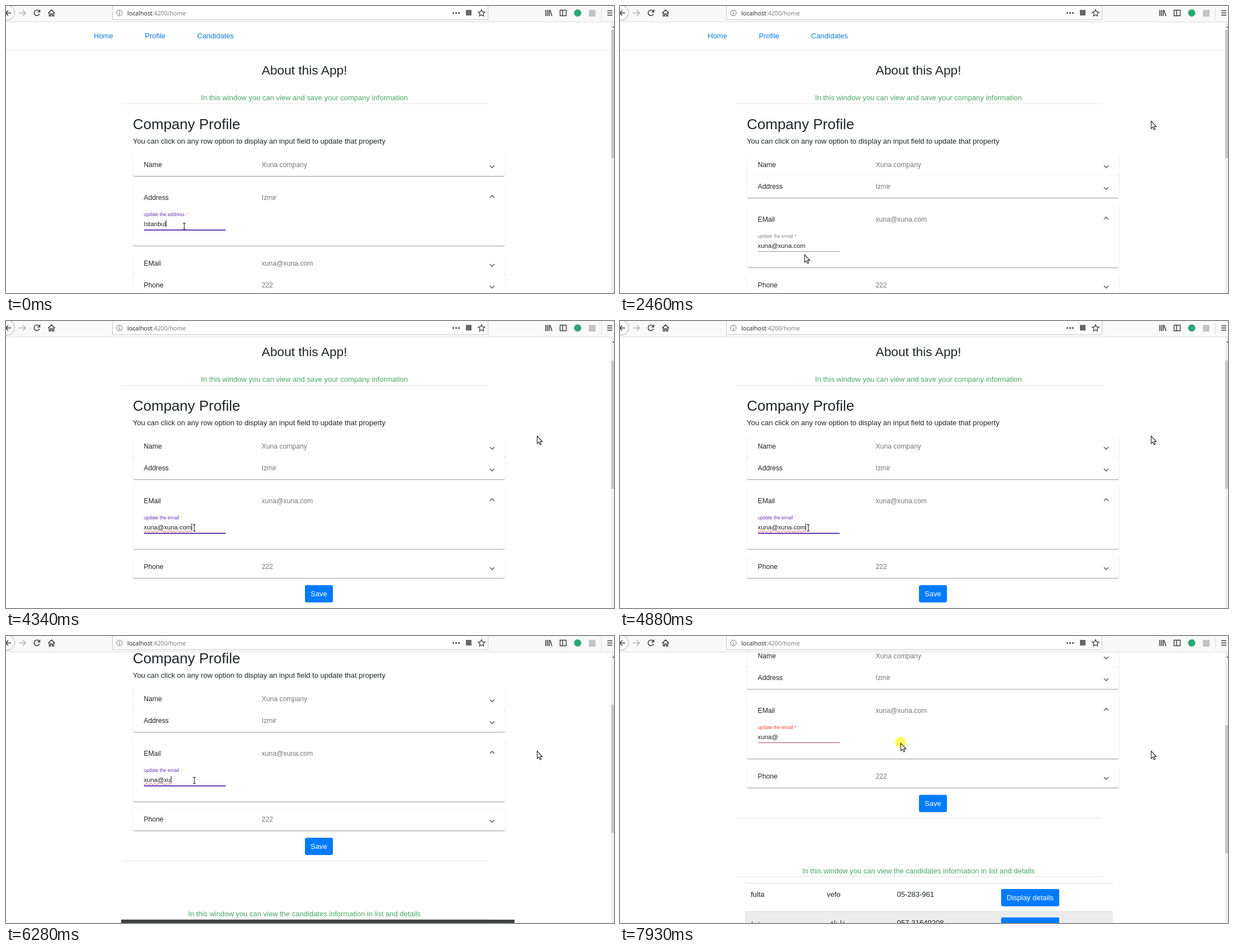
Write an HTML page that moves like this. It is 1088x515 px and loops after 8000 ms.

```html
<!DOCTYPE html>
<html lang="en">
<head>
<meta charset="utf-8">
<title>Company profile</title>
<style>
@property --scroll { syntax: "<integer>"; inherits: true; initial-value: 0; }
@property --swap { syntax: "<number>"; inherits: true; initial-value: 0; }

html, body { margin: 0; width: 100%; height: 100%; overflow: hidden; background: #fff; }
#stage {
  position: relative; width: 1088px; height: 515px; overflow: hidden; background: #fff;
  font: 13px/20px "Liberation Sans", Arial, sans-serif; color: #212529; white-space: nowrap;
  animation: scroll 8s linear infinite, swap 8s cubic-bezier(.4, 0, .2, 1) infinite;
}
#page { position: absolute; left: 0; top: calc(var(--scroll) * -1px); width: 1083px; height: 800px; }
#page *, #thumb, #bar, #pointer { position: absolute; }
#page .erase, #page .caret, #page .star { position: static; }

@keyframes scroll {
  0%, 32.1% { --scroll: 0; }
  37.6% { --scroll: 18; }
  45.25%, 47.5% { --scroll: 46; }
  54.25%, 61% { --scroll: 60; }
  66.9% { --scroll: 128; }
  70.6% { --scroll: 146; }
  72.9%, 74.75% { --scroll: 157; }
  78.5% { --scroll: 172; }
  84.4%, 85.6% { --scroll: 196; }
  89.4% { --scroll: 213; }
  95.1%, 96.4% { --scroll: 239; }
  99.1%, 100% { --scroll: 249; }
}
/* 0: address panel open, 1: email panel open */
@keyframes swap {
  0%, 20.9% { --swap: 0; }
  24.2%, 100% { --swap: 1; }
}

.link { color: #0a7be0; top: 44px; }
.middle { left: 0; width: 1068px; text-align: center; }
.green { color: #45a866; }
.rule { left: 206px; width: 657px; height: 1px; background: #e6e6e6; }
h1, h2 { margin: 0; font-weight: 400; line-height: 30px; }
h1 { font-size: 22.75px; top: 100px; }
h2 { font-size: 26px; }
.button {
  height: 31px; line-height: 31px; padding: 0 10px; border-radius: 3px;
  background: #007bff; color: #fff;
}

.card {
  --open: 0;
  left: 227px; width: 666px; height: calc(39px + 73px * var(--open));
  overflow: hidden; border-radius: 3px; background: #fff;
  box-shadow: 0 2px 1px -1px #0003, 0 1px 1px #00000024, 0 1px 3px #0000001f;
}
.card .head {
  left: 0; top: 0; width: 100%; height: calc(39px + 13px * var(--open));
  font-size: 12.19px; line-height: calc(39px + 13px * var(--open));
}
.head b { left: 19.5px; font-weight: 400; color: #222; }
.head span { left: 230.5px; color: #777; }
.head svg {
  left: 637px; top: calc(50% - 6px); width: 12px; height: 12px; overflow: visible;
  transform: rotate(calc(180deg * var(--open)));
}
.address { --open: calc(1 - var(--swap)); top: calc(305px + 13px * var(--open)); }
.email { --open: var(--swap); top: calc(443px - 86px * var(--open)); }

.field { left: 19.5px; top: 0; width: 146px; height: 112px; opacity: var(--open); }
.field label { left: 0; top: 46px; font-size: 8.53px; }
.field p { left: 0; top: 63px; margin: 0; font-size: 11.375px; color: #222; }
.field hr { left: 0; top: 83px; width: 146px; height: 2px; margin: 0; border: 0; background: currentColor; }
.caret { display: inline-block; width: 1px; height: 13px; background: #222; vertical-align: -2px; }
.field, .star, .caret, .field p, .field hr { animation: 8s step-end infinite; }
.address .field { animation-name: address-colour; }
.address .star { color: #f2c14e; }
.address .caret { animation-name: address-caret; }
.email .field { animation-name: email-colour; }
.email .star { animation-name: email-star; }
.email hr { animation-name: email-line; }
.email p { animation-name: squiggle; text-decoration: underline wavy transparent 1px; text-underline-offset: 1px; }
.email .caret { animation-name: email-caret; }
.erase { animation: erase 8s step-end calc(var(--at) * 1ms - 8000ms) infinite; }

@keyframes address-colour { 0% { color: #673ab7; } 17.5%, 100% { color: #888; } }
@keyframes address-caret { 0% { opacity: 1; } 17.5%, 100% { opacity: 0; } }
@keyframes email-colour { 0% { color: #888; } 37.5% { color: #673ab7; } 97.4%, 100% { color: #f44336; } }
@keyframes email-star { 0% { color: #888; } 37.5% { color: #f2c14e; } 97.4%, 100% { color: #f44336; } }
@keyframes email-line {
  0% { height: 1px; background: #949494; }
  37.5% { height: 2px; background: #673ab7; }
  97.4%, 100% { height: 1px; background: #9c4a62; }
}
@keyframes squiggle {
  0% { text-decoration-color: transparent; }
  37.5% { text-decoration-color: #e0483c; }
  97.4%, 100% { text-decoration-color: transparent; }
}
@keyframes email-caret { 0% { opacity: 0; } 37.5% { opacity: 1; } 88.5%, 100% { opacity: 0; } }
@keyframes erase { 0% { font-size: 0; } 31%, 100% { font-size: 1em; } }

#candidates { left: 206px; top: 681px; width: 704px; height: 119px; overflow: hidden; }
#candidates > div { inset: 0; animation: 8s step-end infinite; }
#candidates .cover { background: #404144; animation-name: cover; }
#candidates .title { animation-name: title; }
#candidates .table { animation-name: table; }
.row { left: 18px; width: 658px; height: 51px; border-top: 1px solid #d9dbdd; }
.row span { top: 10px; }
.row .button { left: 458px; top: 10px; }
.row span:nth-child(1) { left: 10px; }
.row span:nth-child(2) { left: 146px; }
.row span:nth-child(3) { left: 271.5px; }
.row.shade { background: #ececec; }
.shade span[lang] { font-family: "DejaVu Sans", sans-serif; font-size: 12px; }
@keyframes cover { 0% { opacity: 1; } 81%, 100% { opacity: 0; } }
@keyframes title { 0% { opacity: 0; } 81% { opacity: 1; } 93.5%, 100% { opacity: 0; } }
@keyframes table { 0% { opacity: 0; } 93.5%, 100% { opacity: 1; } }

#hand { width: 0; height: 0; animation: hand 8s ease-in-out infinite; }
#hand svg { left: 0; top: 0; overflow: visible; width: 12px; height: 18px; }
#hand .dot {
  left: -10px; top: -11px; width: 20px; height: 20px; border-radius: 50%;
  background: #ffff00a0; animation: dot 8s step-end infinite;
}
#hand .arrow { animation: arrow 8s step-end infinite; }
#hand .beam { animation: beam 8s step-end infinite; }
@keyframes hand {
  0%, 6.1% { left: 319px; top: 395px; }
  16%, 27.75% { left: 265px; top: 460px; }
  30%, 32.1% { left: 330px; top: 446px; }
  35.6%, 90.5% { left: 337px; top: 431px; }
  95.2%, 100% { left: 502px; top: 441px; }
}
@keyframes dot {
  0% { opacity: 0; } 16% { opacity: 1; } 20.9% { opacity: 0; }
  35.6% { opacity: 1; } 37.5% { opacity: 0; } 96.5%, 100% { opacity: 1; }
}
@keyframes arrow { 0% { opacity: 0; } 7.5% { opacity: 1; } 34% { opacity: 0; } 91.5%, 100% { opacity: 1; } }
@keyframes beam { 0% { opacity: 1; } 7.5% { opacity: 0; } 34% { opacity: 1; } 91.5%, 100% { opacity: 0; } }

#pointer { width: 12px; height: 18px; overflow: visible; animation: pointer 8s ease-out infinite; }
@keyframes pointer {
  0%, 6.1% { left: 1004px; top: 488px; opacity: 0; }
  6.2% { left: 1004px; top: 488px; opacity: 1; }
  17.5%, 100% { left: 950px; top: 206px; opacity: 1; }
}

#track { position: absolute; left: 1083px; top: 29px; width: 5px; height: 486px; background: #f0f0f0; }
#thumb { left: 0; top: calc(14px + .468px * var(--scroll)); width: 5px; height: 230px; background: #c6c6c6; }
#bar { left: 0; top: 0; }
#bar text { font: 10.7px "Open Sans", "Noto Sans", sans-serif; }
</style>
</head>
<body>
<div id="stage">
  <svg width="0" height="0" style="position:absolute">
    <symbol id="arrow-shape" overflow="visible">
      <path d="M.5 .5V14L3.5 11.2 5.7 16 7.8 15 5.7 10.4H9.8Z" fill="#fff" stroke="#222" stroke-width="1.1"/>
    </symbol>
    <symbol id="chevron" overflow="visible">
      <path d="M2 6.2L6 10.2 10 6.2" fill="none" stroke="#757575" stroke-width="1.8"/>
    </symbol>
  </svg>

  <div id="page">
    <span class="link" style="left:157px">Home</span>
    <span class="link" style="left:248.5px">Profile</span>
    <span class="link" style="left:342px">Candidates</span>
    <div class="rule" style="left:0;width:1083px;top:79px"></div>
    <h1 class="middle">About this App!</h1>
    <div class="middle green" style="top:155px">In this window you can view and save your company information</div>
    <div class="rule" style="top:175px"></div>
    <h2 style="left:227px;top:197px">Company Profile</h2>
    <div style="left:227px;top:233px">You can click on any row option to display an input field to update that property</div>

    <div class="card" style="top:266px">
      <div class="head"><b>Name</b><span>Xuna company</span><svg><use href="#chevron"/></svg></div>
    </div>
    <div class="card address">
      <div class="head"><b>Address</b><span>Izmir</span><svg><use href="#chevron"/></svg></div>
      <div class="field">
        <label>update the address <i class="star">*</i></label>
        <p>Istanbul<i class="caret"></i></p>
        <hr>
      </div>
    </div>
    <div class="card email">
      <div class="head"><b>EMail</b><span>xuna@xuna.com</span><svg><use href="#chevron"/></svg></div>
      <div class="field">
        <label>update the email <i class="star">*</i></label>
        <p>xuna@<span class="erase" style="--at:6750">x</span><span class="erase" style="--at:6600">u</span><span class="erase" style="--at:6200">n</span><span class="erase" style="--at:6110">a</span><span class="erase" style="--at:6020">.</span><span class="erase" style="--at:5930">c</span><span class="erase" style="--at:5840">o</span><span class="erase" style="--at:5750">m</span><i class="caret"></i></p>
        <hr>
      </div>
    </div>
    <div class="card" style="top:482px">
      <div class="head"><b>Phone</b><span>222</span><svg><use href="#chevron"/></svg></div>
    </div>
    <div class="button" style="left:535px;top:534px">Save</div>
    <div class="rule" style="top:575px"></div>

    <div class="middle green" style="top:661px">In this window you can view the candidates information in list and details</div>
    <div class="rule" style="top:680px"></div>
    <div id="candidates">
      <div class="title"><h2 style="left:18.5px;top:21px">List of Candidates</h2></div>
      <div class="table">
        <div class="row" style="top:11px">
          <span>fulta</span><span>vefo</span><span>05-283-961</span><div class="button">Display details</div>
        </div>
        <div class="row shade" style="top:62px">
          <span lang="ar">ترة</span><span lang="ar">غليتاف</span><span>057-31649208</span><div class="button">Display details</div>
        </div>
      </div>
      <div class="cover"></div>
    </div>

    <div id="hand">
      <div class="dot"></div>
      <svg class="arrow"><use href="#arrow-shape"/></svg>
      <svg class="beam"><path d="M-2.5 -5.5H-1L0 -4.5 1 -5.5H2.5M0 -4.5V5M-2.5 6H-1L0 5 1 6H2.5" fill="none" stroke="#222" stroke-width="1.1"/></svg>
    </div>
  </div>

  <div id="track">
    <div id="thumb"></div>
    <svg width="5" height="14" style="position:absolute;left:0;top:0"><path d="M2 10L5 7V10Z" fill="#555"/></svg>
  </div>

  <svg id="bar" width="1088" height="29" fill="none" stroke="#3c3c40" stroke-width="1.6">
    <path d="M0 0H1088V29H0Z" fill="#f9f9fa" stroke="none"/>
    <path d="M0 28.5H1088" stroke="#dcdcde" stroke-width="1"/>
    <path d="M190.500 -4V24.500H862.500V-4" fill="#fff" stroke="#c8c8ca" stroke-width="1"/>
    <circle cx="2" cy="12" r="13.500" fill="#fdfdfd" stroke="#aaa" stroke-width="1"/>
    <path d="M9 12.500H0M4 8L-.5 12.500 4 17"/>
    <path d="M23 12.500H35M30 7.500L35 12.500 30 17.500" stroke="#b4b4b6"/>
    <path d="M59.500 9.500A5 5 0 1 0 60 14M60.500 6.500V10.800H56.200"/>
    <path d="M75.500 12.700L81.500 7 87.500 12.700M77.500 12V18H80V14H83V18H85.500V12"/>
    <circle cx="203" cy="12.500" r="5" stroke="#666" stroke-width="1"/>
    <path d="M203 12V15.500M203 9.500V10.700" stroke="#666" stroke-width="1.2"/>
    <text x="217" y="17" fill="#222" stroke="none">localhost<tspan fill="#777">:4200/home</tspan></text>
    <path d="M800.500 12.500h.01M805.500 12.500h.01M810.500 12.500h.01" stroke-width="3" stroke-linecap="round"/>
    <path d="M823 7H833V17H823Z" fill="#66666a" stroke="none"/>
    <path d="M851 6.500L852.800 10.500 857 11 853.900 13.900 854.700 18 851 16 847.300 18 848.100 13.900 845 11 849.200 10.500Z" stroke-width="1.3"/>
    <path d="M966 7V18M969 7V18M972 7V18M973.500 7.500L977 18"/>
    <path d="M991.500 7.500H1002.500V17.500H991.500ZM996 7.500V17.500" stroke-width="1.4"/>
    <circle cx="1023" cy="12.500" r="6.500" fill="#2aa876" stroke="none"/>
    <path d="M1043 7H1055V19H1043Z" fill="#c4c4c4" stroke="none"/>
    <path d="M1065.500 3V25" stroke="#dcdcde" stroke-width="1"/>
    <path d="M1076 8.500H1085M1076 12.500H1085M1076 16.500H1085"/>
  </svg>

  <svg id="pointer"><use href="#arrow-shape"/></svg>
</div>
</body>
</html>
```
